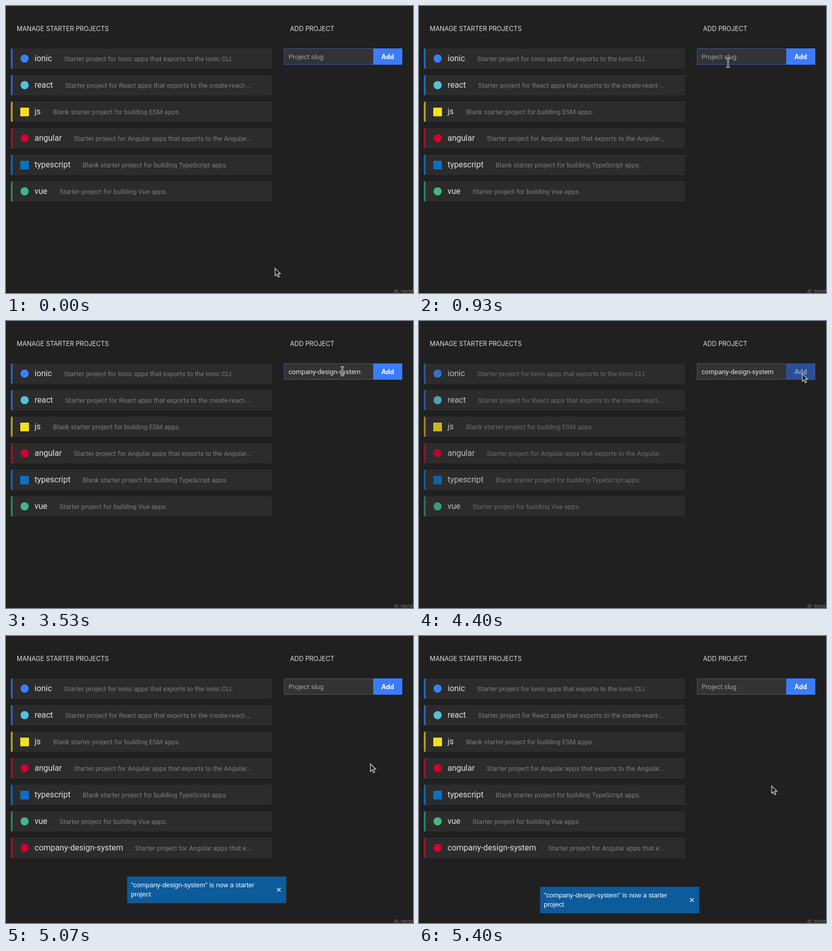
An HTML page with a canvas that plays this animation: 798x562 px, repeating every 6600 ms.

```html
<!DOCTYPE html>
<html lang="en">
<head>
<meta charset="utf-8">
<title>Starter projects</title>
<style>
html, body { margin: 0; height: 100%; overflow: hidden; background: #202020; }
canvas { display: block; }
</style>
</head>
<body>
<canvas id="stage" width="798" height="562"></canvas>
<script>
const ctx = document.getElementById('stage').getContext('2d');
const LOOP = 6600, TICK = 200 / 3;
const PASTE = 2660, CLICK = 4130, DONE = 4650;
const SLUG = 'company-design-system';
const ROBOTO = 'Roboto, sans-serif', INTER = 'Inter, sans-serif';

// name, description, description x, bar colour, icon colour, round icon
const rows = [
  ['ionic', 'Starter project for Ionic apps that exports to the Ionic CLI.', 114, '#3264bd', '#3880ff', true],
  ['react', 'Starter project for React apps that exports to the create-react-…', 116, '#3264b4', '#53c1de', true],
  ['js', 'Blank starter project for building ESM apps.', 92, '#b5a127', '#f7df1e', false],
  ['angular', 'Starter project for Angular apps that exports to the Angular…', 133, '#a0142d', '#d3002f', true],
  ['typescript', 'Blank starter project for building TypeScript apps.', 150, '#1766b3', '#0b6fc4', false],
  ['vue', 'Starter project for building Vue apps.', 105, '#34805f', '#41b883', true],
  [SLUG, 'Starter project for Angular apps that e…', 253, '#a0142d', '#d3002f', true]
];

// time, x, y of the pointer
const path = [
  [0, 527, 513], [60, 527, 513], [733, 606, 142], [933, 606, 105], [1333, 607, 99],
  [3335, 607, 99], [3533, 690, 98], [3800, 751, 103], [4730, 751, 103],
  [5067, 714, 250], [5400, 691, 293], [LOOP, 691, 293]
];

const clamp = v => Math.min(1, Math.max(0, v));
const mix = (a, b, p) => a + (b - a) * p;
const easeOut = p => 1 - (1 - p) ** 3;

// Smooth curve through the path that never overshoots
function pointer(t, axis) {
  const i = Math.max(1, path.findIndex(k => k[0] > t)) - 1;
  const slope = j => path[j] && path[j + 1]
    ? (path[j + 1][axis] - path[j][axis]) / (path[j + 1][0] - path[j][0]) : 0;
  const tangent = j => {
    const a = slope(j - 1), b = slope(j);
    return a * b > 0 ? 2 * a * b / (a + b) : 0;
  };
  const a = path[i], b = path[i + 1], h = b[0] - a[0], p = (t - a[0]) / h;
  return mix(a[axis], b[axis], p * p * (3 - 2 * p))
    + h * p * (1 - p) * ((1 - p) * tangent(i) - p * tangent(i + 1));
}

function bounce(p) {
  const keys = [[0, 3000], [.6, -20], [.75, 10], [.9, -5], [1, 0]];
  const i = keys.findIndex(k => k[0] > p);
  if (i < 0) return 0;
  const [p0, y0] = keys[i - 1], [p1, y1] = keys[i];
  return mix(y0, y1, easeOut((p - p0) / (p1 - p0)));
}

function text(str, x, y, font, color) {
  ctx.font = font;
  ctx.fillStyle = color;
  ctx.fillText(str, x, y);
}

function rect(x, y, w, h, color) {
  ctx.fillStyle = color;
  ctx.fillRect(x, y, w, h);
}

function clipped(shape, draw) {
  ctx.save();
  ctx.beginPath();
  shape();
  ctx.clip();
  draw();
  ctx.restore();
}

function drawRow([name, info, infoX, bar, icon, round], i, alpha) {
  const y = 83 + 52 * i;
  clipped(() => ctx.roundRect(9.5, y, 512, 40, 3), () => {
    rect(9, y, 513, 40, '#2c2c2c');
    ctx.globalAlpha = alpha;
    rect(9, y, 4, 40, bar);
  });
  ctx.globalAlpha = alpha;
  ctx.fillStyle = icon;
  ctx.beginPath();
  if (round) ctx.arc(36.5, y + 20, 8, 0, 7);
  else ctx.rect(28, y + 12, 17, 17);
  ctx.fill();
  text(name, 56, y + 25, '16px ' + ROBOTO, '#e2e2e2');
  clipped(() => ctx.rect(infoX - 2, y, 400, 27.3),
    () => text(info, infoX, y + 25.2, '13px ' + ROBOTO, '#7d7d7d'));
  ctx.globalAlpha = 1;
}

function drawForm(t, hover) {
  const focused = t < CLICK, typed = t >= PASTE && t < DONE;
  rect(545, 83, 176, 32, focused ? '#3c5a9e' : '#565656');
  rect(546, 84, 174, 30, '#333');
  text(typed ? SLUG : 'Project slug', 554, 104, '13px ' + ROBOTO, typed ? '#e6e6e6' : '#a3a3a3');

  const blink = Math.floor((t < PASTE ? t - 200 : t - 2600) / 530);
  if (focused && blink >= 0 && blink % 2 === 0) rect(typed ? 695 : 555, 92, 1, 16, '#ddd');

  const fade = t < DONE ? clamp((t - CLICK) / 200) : 1 - clamp((t - DONE) / 250);
  rect(720, 83, 57, 32, '#202020');
  ctx.globalAlpha = 1 - .4 * fade;
  rect(720, 83, 57, 32, hover ? '#3875f0' : '#3b7cff');
  ctx.globalAlpha = fade;
  rect(722, 85, 53, 28, '#294f96');
  ctx.globalAlpha = 1 - .55 * fade;
  text('Add', 736, 104, '700 12.5px ' + INTER, '#fff');
  ctx.globalAlpha = 1;
}

function drawToast(t) {
  if (t < DONE) return;
  const p = (t - DONE) / 700, y = 491 + bounce(p), font = '13px "Liberation Sans", sans-serif';
  ctx.globalAlpha = easeOut(clamp(p / .6));
  rect(237.5, y, 312, 52, '#0c5b9b');
  text(`"${SLUG}" is now a starter`, 245, y + 21, font, '#fff');
  text('project', 245, y + 39, font, '#fff');
  ctx.strokeStyle = '#fff';
  ctx.lineWidth = 1.3;
  ctx.beginPath();
  for (const s of [-1, 1]) {
    ctx.moveTo(531.5, y + 26 - 3.5 * s);
    ctx.lineTo(538.5, y + 26 + 3.5 * s);
  }
  ctx.stroke();
  ctx.globalAlpha = 1;
}

const arrow = new Path2D('M.5 .5V15.3L4 12 6.4 17.8 8.9 16.7 6.5 11H11Z');
const beam = new Path2D('M-3.5 -8.5Q0 -8.5 0 -6Q0 -8.5 3.5 -8.5M0 -6V6M-3.5 8.5Q0 8.5 0 6Q0 8.5 3.5 8.5M-2 2H2');

function drawPointer(x, y) {
  const overInput = x > 545 && x < 720 && y > 83 && y < 116;
  ctx.save();
  ctx.translate(x, y);
  ctx.strokeStyle = '#d4d4d4';
  if (overInput) {
    ctx.lineWidth = 3;
    ctx.stroke(beam);
    ctx.strokeStyle = '#222';
    ctx.lineWidth = 1;
    ctx.stroke(beam);
  } else {
    ctx.fillStyle = '#1a1a1a';
    ctx.lineWidth = 1.3;
    ctx.fill(arrow);
    ctx.stroke(arrow);
  }
  ctx.restore();
}

function draw(t) {
  const x = pointer(t, 1), y = pointer(t, 2);
  const dim = t < DONE ? clamp((t - CLICK) / 520) : 1 - clamp((t - DONE) / 260);
  rect(0, 0, 798, 562, '#202020');
  text('MANAGE STARTER PROJECTS', 21, 49, '12.4px ' + INTER, '#dedede');
  text('ADD PROJECT', 557, 49, '12.4px ' + INTER, '#dedede');
  text('© 2020', 761, 565, '12px ' + ROBOTO, '#7d7d7d');
  rows.slice(0, t < DONE ? 6 : 7).forEach((row, i) => drawRow(row, i, 1 - .4 * dim));
  drawForm(t, x > 720 && y > 83 && y < 115);
  drawToast(t);
  drawPointer(x, y);
}

let start;
function frame(now) {
  start ??= now;
  const t = (now - start) % LOOP;
  draw(Math.floor(t / TICK) * TICK);
  requestAnimationFrame(frame);
}
requestAnimationFrame(frame);
</script>
</body>
</html>
```
